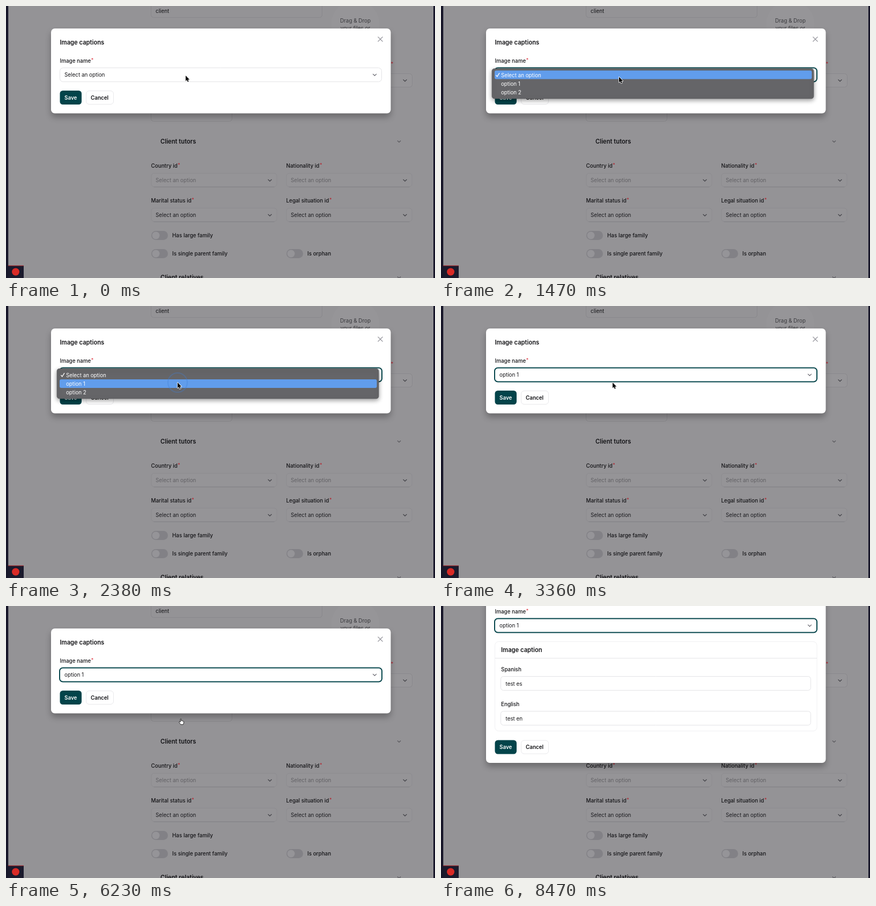
An HTML page with a canvas that plays this animation: 800x508 px, repeating every 8.96 s.

```html
<!DOCTYPE html>
<html lang="en">
<head>
<meta charset="utf-8">
<title>Image captions</title>
<style>
html, body { margin: 0; width: 100%; height: 100%; overflow: hidden; background: #949396; }
canvas { display: block; width: 100vw; height: 100vh; }
</style>
</head>
<body>
<canvas id="stage" width="800" height="508"></canvas>
<script>
const ctx = document.getElementById('stage').getContext('2d');
const LOOP = 8960, STEP = 70;
const TEAL = '#03444a', RED = '#b3202c', INK = '#131316';
const MENU_OPEN = 980, FOCUS = 1120, CLICK = 2100, MENU_FADE = 2380, GROW = 6300, HIDE = 8400;

// Pointer stops: time, x, y. Moves are eased between them.
const PATH = [
  [0, 335, 130], [1330, 335, 130], [1820, 320, 143], [5110, 320, 143],
  [5600, 322, 178], [5950, 322, 178], [6230, 323, 210], [6720, 323, 210],
  [7280, 225, 264], [7630, 231, 263], [8050, 268, 438], [LOOP, 268, 438]
];

const clamp = v => Math.max(0, Math.min(1, v));
const ease = v => v * v * (3 - 2 * v);

function pointer(t) {
  const i = PATH.findIndex((p, n) => n > 0 && t <= p[0]);
  const [t0, x0, y0] = PATH[i - 1], [t1, x1, y1] = PATH[i];
  const k = ease((t - t0) / (t1 - t0));
  return { x: x0 + (x1 - x0) * k, y: y0 + (y1 - y0) * k };
}

// y is the middle of the capitals
function text(str, x, y, { size = 9.9, weight = 400, color = INK, align = 'left' } = {}) {
  ctx.font = `${weight} ${size}px Inter, "Liberation Sans", sans-serif`;
  ctx.textAlign = align;
  ctx.fillStyle = color;
  ctx.fillText(str, x, y + size * 0.364);
  return ctx.measureText(str).width;
}

function box(x, y, w, h, r, fill, stroke, line = 1) {
  ctx.beginPath();
  ctx.roundRect(x, y, w, h, r);
  if (fill) { ctx.fillStyle = fill; ctx.fill(); }
  if (stroke) { ctx.strokeStyle = stroke; ctx.lineWidth = line; ctx.stroke(); }
}

function shadow(color, blur, dy, draw) {
  ctx.save();
  ctx.shadowColor = color;
  ctx.shadowBlur = blur;
  ctx.shadowOffsetY = dy;
  draw();
  ctx.restore();
}

function line(points, color, width = 1) {
  ctx.beginPath();
  points.forEach(([x, y]) => ctx.lineTo(x, y));
  ctx.strokeStyle = color;
  ctx.lineWidth = width;
  ctx.stroke();
}

function chevron(x, y, color = '#3b3b40', s = 3.4) {
  line([[x - s, y - s / 2], [x, y + s / 2], [x + s, y - s / 2]], color, 1.2);
}

function label(str, x, y, star = RED) {
  const w = text(str, x, y, { weight: 500 });
  text('*', x + w + 0.5, y - 1.5, { size: 8.5, weight: 500, color: star });
}

function pageSelect(name, x, y, disabled) {
  label(name, x, y);
  box(x + 0.5, y + 14.5, 234, 25, 5, '#959497', '#8d8c90');
  line([[x + 5, y + 40], [x + 230, y + 40]], '#828186');
  text('Select an option', x + 8.5, y + 27, { color: disabled ? '#626165' : '#1b1b1f' });
  chevron(x + 221.5, y + 27.5);
}

function toggle(name, x, y) {
  box(x, y - 8.5, 31, 17, 8.5, '#828186');
  box(x + 1.5, y - 7, 14, 14, 7, '#959498');
  text(name, x + 39, y, { weight: 500 });
}

function page() {
  ctx.fillStyle = '#949396';
  ctx.fillRect(0, 0, 800, 508);

  box(270.5, -6, 319, 27.5, 5, null, '#89888c');
  text('client', 279, 9);
  ctx.beginPath();
  ctx.arc(651.5, 34, 45, 0, Math.PI * 2);
  ctx.fillStyle = '#969598';
  ctx.fill();
  const drop = { color: '#39393d', align: 'center' };
  text('Drag & Drop', 651.5, 27, drop);
  text('your files or', 651.5, 41, drop);
  text('*', 717.5, 108, { size: 9, weight: 500, color: RED });
  box(522.5, 126.5, 235, 25, 5, '#969598', '#8a898d');
  chevron(744, 139);
  box(270.5, 190.5, 151, 25, 5, null, '#88878b');

  text('Client tutors', 288, 253, { size: 11.2, weight: 600 });
  chevron(733, 253, '#58575c', 3);
  pageSelect('Country id', 270.5, 298, true);
  pageSelect('Nationality id', 522.5, 298, true);
  pageSelect('Marital status id', 270.5, 363, false);
  pageSelect('Legal situation id', 522.5, 363, false);
  toggle('Has large family', 271, 428.5);
  toggle('Is single parent family', 271, 462.5);
  toggle('Is orphan', 523, 462.5);
  text('Client relatives', 288, 507, { size: 11.2, weight: 600 });
  chevron(733, 507, '#58575c', 3);

  ctx.fillStyle = '#171629';
  ctx.fillRect(0, 0, 4, 508);
  ctx.fillRect(797, 0, 3, 508);
  ctx.fillStyle = '#77767c';
  ctx.fillRect(4, 0, 1, 485);
  ctx.fillStyle = '#1b1a2d';
  ctx.fillRect(4, 485, 29, 23);
  ctx.fillStyle = '#b52a2f';
  ctx.fillRect(4, 484.5, 29, 1);
  ctx.beginPath();
  ctx.arc(18, 496.5, 7, 0, Math.PI * 2);
  ctx.fillStyle = '#d92a26';
  ctx.fill();
}

function field(name, value, y) {
  text(name, 112, y, { weight: 500 });
  box(111.5, y + 13.5, 578, 26, 5, '#fff', '#e3e3e6');
  text(value, 120.5, y + 27);
}

function captionCard() {
  box(100.5, 66.5, 600.5, 167, 7, '#fff', '#f0f0f2');
  line([[101, 97.5], [701, 97.5]], '#e4e4e7');
  text('Image caption', 112, 81.5, { size: 11.2, weight: 600 });
  field('Spanish', 'test es', 118);
  field('English', 'test en', 183);
}

function modal(t) {
  const grown = t >= GROW;
  const up = grown ? -92 : 0, h = grown ? 343 : 158.5;
  shadow('rgba(0,0,0,0.28)', 12, 7, () => box(84, 42 + up, 633.5, h, 7, '#fff'));

  ctx.save();
  ctx.translate(0, up);
  text('Image captions', 100.5, 68, { size: 11.2, weight: 600 });
  line([[693.5, 57.5], [702.5, 66.5]], '#98989f', 1.2);
  line([[702.5, 57.5], [693.5, 66.5]], '#98989f', 1.2);
  label('Image name', 100.5, 102, '#dc2c38');
  const focus = t >= FOCUS;
  if (focus) box(100, 115.5, 601, 26, 6, '#fff', TEAL, 2);
  else box(100.5, 115.5, 600, 26, 6, '#fff', '#e3e3e6');
  text(t >= MENU_FADE ? 'option 1' : 'Select an option', 109, 128.5);
  chevron(687.5, 128.5, '#62626a');
  ctx.restore();

  if (grown) captionCard();
  const y = grown ? 250.5 : 158;
  box(100.5, y, 40.5, 26, 5.5, TEAL);
  text('Save', 120.7, y + 13, { weight: 600, color: '#fff', align: 'center' });
  box(149.5, y + 0.5, 51, 25, 5.5, '#fff', '#e8e8eb');
  text('Cancel', 174.6, y + 13, { weight: 600, align: 'center' });
}

function menu(t, p) {
  if (t < MENU_OPEN || t >= MENU_FADE + 280) return;
  ctx.save();
  ctx.globalAlpha = 1 - clamp((t - MENU_FADE) / 280);
  shadow('rgba(0,0,0,0.4)', 9, 3, () => box(95, 117, 600, 56, 4.5, '#656568', '#58585b', 0.6));
  const blink = t >= CLICK + 140 && t < CLICK + 210;
  if (!blink) box(100, p.y < 137 ? 120.5 : 137, 591.5, 16, 3, '#619dec');
  ['Select an option', 'option 1', 'option 2'].forEach((s, i) =>
    text(s, 112, 129 + i * 16.2, { size: 9.8, color: '#fff' }));
  line([[102.5, 129], [104.7, 131.8], [109, 125.2]], '#fff', 1.3);
  ctx.restore();
}

function ring(t, start, p) {
  const age = t - start;
  if (age < 0 || age >= 350) return;
  ctx.save();
  ctx.globalAlpha = 1 - clamp((age - 140) / 210);
  ctx.beginPath();
  ctx.arc(p.x, p.y, 11 + Math.min(age, 140) / 20, 0, Math.PI * 2);
  ctx.strokeStyle = '#3f7fd6';
  ctx.lineWidth = 2;
  ctx.stroke();
  ctx.restore();
}

const arrow = new Path2D('M0 0V10.2L2.3 8.1L3.9 11.8L5.7 11L4.1 7.4H7.3Z');
const hand = new Path2D('M2.2 6.6V1.2Q3 -.4 3.9 1.2V4.4Q5 3.6 5.6 4.8Q6.8 4.2 7.2 5.4Q8.6 4.9 8.6 6.6Q8.6 9.4 7.4 11.4H2.9Q1.4 9.4 -.4 7.2Q-.4 5.4 2.2 6.6Z');
const beam = new Path2D('M-2.8 -5.4Q-.3 -5.4 0 -4Q.3 -5.4 2.8 -5.4M0 -4V4M-2.8 5.4Q-.3 5.4 0 4Q.3 5.4 2.8 5.4M-1.4 1.4H1.4');

function cursor(t, { x, y }) {
  if (t >= HIDE) return;
  const grown = t >= GROW;
  ctx.save();
  ctx.translate(x, y);
  ctx.lineJoin = 'round';
  if (y > (grown ? 293 : 200)) {
    ctx.fillStyle = '#fff';
    ctx.fill(hand);
    ctx.strokeStyle = '#111';
    ctx.lineWidth = 0.9;
    ctx.stroke(hand);
  } else if (grown) {
    ctx.strokeStyle = '#fff';
    ctx.lineWidth = 2.4;
    ctx.stroke(beam);
    ctx.strokeStyle = '#111';
    ctx.lineWidth = 1.1;
    ctx.stroke(beam);
  } else {
    ctx.strokeStyle = '#fff';
    ctx.lineWidth = 1.6;
    ctx.stroke(arrow);
    ctx.fillStyle = '#000';
    ctx.fill(arrow);
  }
  ctx.restore();
}

function draw(now) {
  const t = Math.floor((now % LOOP) / STEP) * STEP;
  const p = pointer(t);
  page();
  modal(t);
  menu(t, p);
  ring(t, MENU_OPEN - 0, p);
  ring(t, CLICK, p);
  cursor(t, p);
}

const start = performance.now();
function tick() {
  draw(performance.now() - start);
  requestAnimationFrame(tick);
}
tick();
</script>
</body>
</html>
```
